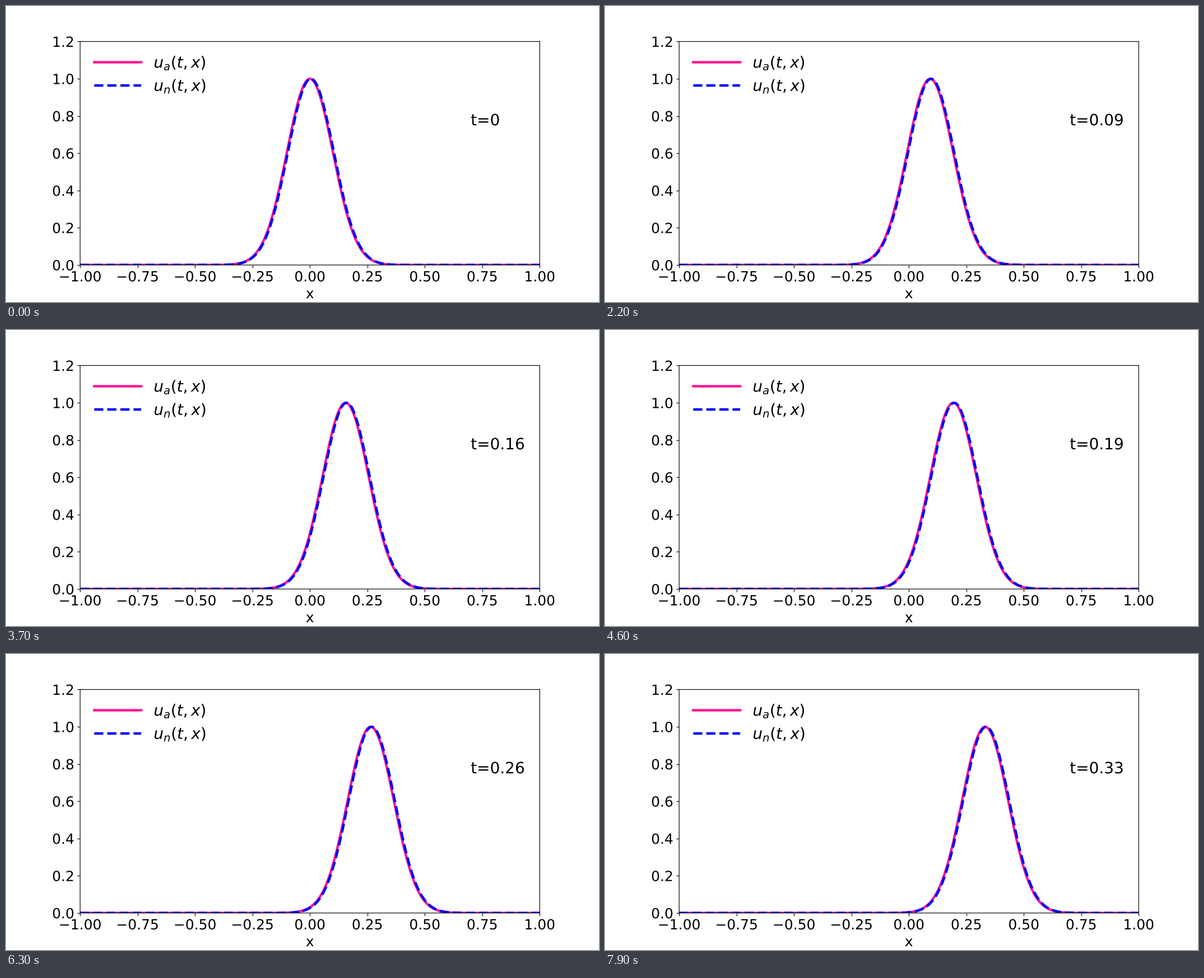
A matplotlib script for the animation above (8000 ms loop, 1058 by 529 pixels).

```python
import numpy as np
import matplotlib.pyplot as plt
from matplotlib.animation import FuncAnimation
from matplotlib.patheffects import Normal

FRAMES = 80
DT = 0.0042      # simulated time per frame
SIGMA = 0.1
TICK_SIZE = 17
TEXT_SIZE = 19

# draw outlines at exact sub-pixel positions, text included
plt.rcParams.update({
    "font.family": "DejaVu Sans",
    "mathtext.fontset": "dejavusans",
    "text.hinting": "none",
    "path.snap": False,
    "path.effects": [Normal()],
})

x = np.linspace(-1, 1, 401)


def pulse(center):
    return np.exp(-(x - center) ** 2 / (2 * SIGMA ** 2))


fig, ax = plt.subplots(figsize=(10, 5), dpi=105.8)
fig.subplots_adjust(left=0.125, right=0.9, bottom=0.125, top=0.88)
ax.set_xlim(-1, 1)
ax.set_ylim(0, 1.2)
ax.tick_params(labelsize=TICK_SIZE)
ax.set_xlabel("x", fontsize=TICK_SIZE)

exact, = ax.plot(x, pulse(0), color="deeppink", lw=3, label="$u_a(t,x)$")
numeric, = ax.plot(x, pulse(DT), "--", color="blue", lw=3, label="$u_n(t,x)$")
clock = ax.text(0.7, 0.75, "t=0", fontsize=TEXT_SIZE)
ax.legend(loc="upper left", bbox_to_anchor=(0, 1.004), fontsize=TEXT_SIZE,
          handlelength=3, labelspacing=0.41, frameon=False)


def update(n):
    t = n * DT if n else 0
    exact.set_ydata(pulse(t))
    # the numerical solution runs one step ahead
    numeric.set_ydata(pulse(t + DT))
    clock.set_text(f"t={round(t, 2)}")
    return exact, numeric, clock


anim = FuncAnimation(fig, update, frames=FRAMES, interval=100,
                     repeat=True, repeat_delay=0)
plt.show()
```
